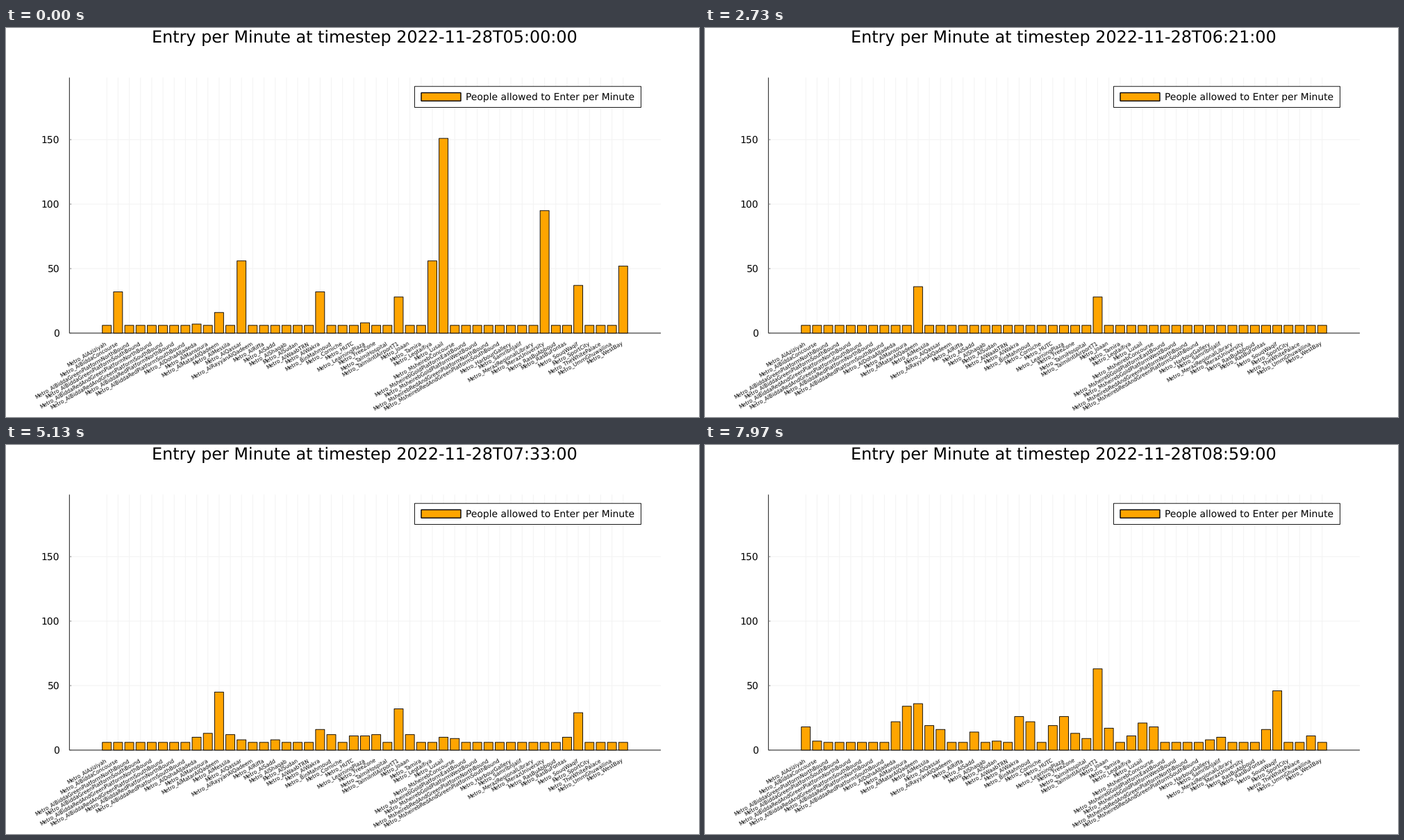
A matplotlib script that plays this animation: 998 by 561 pixels, repeating every 8000 ms.

```python
import matplotlib.pyplot as plt
from matplotlib.animation import FuncAnimation
from matplotlib.collections import LineCollection, PolyCollection
from matplotlib.patches import Rectangle

W, H, DPI = 998, 561, 100
FRAMES, LOOP_MS = 240, 8000
LEFT, RIGHT, TOP, BASE = 91.3, 943, 71.5, 440
FIRST_X, STEP_X = 145.2, 16.165
BAR_W = 0.8 * STEP_X
UNIT = 1.86          # pixels per person
FLOOR = 6            # least entry rate of any station
SLOTS = 8            # half-hour slots from 05:00 to 08:30

STATIONS = """
AlAziziyah AlBiddaConcourse
AlBiddaGreenPlatformNorthBound AlBiddaGreenPlatformSouthBound
AlBiddaRedAndGreenPlatformNorthBound AlBiddaRedAndGreenPlatformSouthBound
AlBiddaRedPlatformNorthBound AlBiddaRedPlatformSouthBound
AlDohaAlJadeda AlMansoura AlMatarAlQadeem AlMessila AlQassar
AlRayyanAlQadeem AlRiffa AlSadd AlShaqab AlSudan AlWaabTRN AlWakra
BinMahmoud Corniche HUTC LearningPlaza FreeZone TalmiHospital
TalmiIntlAirportT1 Joaan Tamira Legtaifiya Lusail MsheirebConcourse
MsheirebGoldPlatformEastBound MsheirebGoldPlatformWestBound
MsheirebRedAndGreenPlatformNorthBound MsheirebRedAndGreenPlatformSouthBound
HarbourGallery SamrIbnJalif MerazRegionalLibrary MerazUniversity
RasBuAbboud RasBuFontas SouqWaqif SportCity TheWhitePalace
UmmGhuwailina WestBay
""".split()

# Rates in the first half hour, where above the floor
OPENING = dict(
    AlBiddaConcourse=32, AlDohaAlJadeda=7, AlMatarAlQadeem=16, AlQassar=56,
    AlWakra=32, LearningPlaza=8, TalmiIntlAirportT1=28, Legtaifiya=56,
    Lusail=151, MerazUniversity=95, SouqWaqif=37, WestBay=52,
)

# Rates of the last slots of the morning; each run ends at 08:30
MORNING = dict(
    AlAziziyah=(11, 18),
    AlBiddaConcourse=(7,),
    AlDohaAlJadeda=(8, 10, 17, 22),
    AlMansoura=(7, 9, 13, 21, 34),
    AlMatarAlQadeem=(36, 42, 44, 45, 42, 36),
    AlMessila=(7, 12, 15, 19),
    AlQassar=(8, 11, 16),
    AlSadd=(8, 11, 14),
    AlSudan=(7,),
    AlWakra=(10, 16, 20, 26),
    BinMahmoud=(8, 11, 12, 17, 22),
    HUTC=(8, 11, 15, 19),
    LearningPlaza=(11, 19, 26),
    FreeZone=(7, 10, 12, 13, 13),
    TalmiHospital=(9,),
    TalmiIntlAirportT1=(28, 34, 32, 32, 45, 63),
    Joaan=(9, 12, 13, 17),
    Legtaifiya=(11,),
    Lusail=(10, 14, 21),
    MsheirebConcourse=(7, 9, 12, 18),
    HarbourGallery=(8,),
    SamrIbnJalif=(10,),
    RasBuFontas=(10, 11, 16),
    SouqWaqif=(26, 27, 29, 34, 46),
    UmmGhuwailina=(9, 11),
)

plt.rcParams["font.family"] = "DejaVu Sans"
plt.rcParams["text.hinting"] = "none"


def px(size):
    """Convert pixels to points."""
    return size * 72 / DPI


def rate(name, slot):
    if slot == 0:
        return OPENING.get(name, FLOOR)
    run = MORNING.get(name, ())
    i = slot - (SLOTS - len(run))
    return run[i] if i >= 0 else FLOOR


def bar_x(i):
    return FIRST_X + i * STEP_X


def bar_shapes(slot):
    shapes = []
    for i, name in enumerate(STATIONS):
        x0, x1 = bar_x(i) - BAR_W / 2, bar_x(i) + BAR_W / 2
        y = BASE - rate(name, slot) * UNIT
        shapes.append([(x0, BASE), (x0, y), (x1, y), (x1, BASE)])
    return shapes


def add_lines(segments, color, width, z):
    ax.add_collection(LineCollection(
        segments, colors=color, linewidths=px(width), snap=False, zorder=z))


def add_box(x, y, w, h, fill, width, z):
    ax.add_patch(Rectangle(
        (x, y), w, h, facecolor=fill, edgecolor="black",
        linewidth=px(width), snap=False, zorder=z))


fig = plt.figure(figsize=(W / DPI, H / DPI), dpi=DPI, facecolor="white")
ax = fig.add_axes([0, 0, 1, 1])
ax.set_xlim(0, W)
ax.set_ylim(H, 0)
ax.axis("off")

xs = [bar_x(i) for i in range(len(STATIONS))]
levels = [(v, BASE - v * UNIT) for v in (0, 50, 100, 150)]

add_lines([[(x, TOP), (x, BASE)] for x in xs]
          + [[(LEFT, y), (RIGHT, y)] for _, y in levels], "#f3f3f3", 1, 1)
add_lines([[(LEFT, TOP), (LEFT, BASE)], [(LEFT, BASE), (RIGHT, BASE)]],
          "black", 0.9, 2)
add_lines([[(LEFT, y), (LEFT + 3, y)] for _, y in levels], "#666666", 0.7, 2)

for value, y in levels:
    ax.text(77.3, y + 5.2, str(value), ha="right", va="baseline",
            fontsize=px(13.9))
for x, name in zip(xs, STATIONS):
    ax.text(x + 0.5, 456, "Metro_" + name, ha="right", va="baseline",
            rotation=30, rotation_mode="anchor", fontsize=px(7.6))

bars = PolyCollection(bar_shapes(0), facecolors="orange", edgecolors="black",
                      linewidths=px(0.9), closed=True, snap=False, zorder=3)
ax.add_collection(bars)

add_box(588.5, 84.2, 326, 30.3, "white", 0.9, 4)
add_box(598, 93.4, 57, 11.8, "orange", 1.4, 5)
ax.text(662.3, 104.5, "People allowed to Enter per Minute",
        va="baseline", fontsize=px(13.9), zorder=5)

title = ax.text(516.2, 21.3, "", ha="center", va="baseline",
                fontsize=px(23.9))


def draw(minute):
    hour, rest = divmod(minute, 60)
    title.set_text("Entry per Minute at timestep "
                   f"2022-11-28T{5 + hour:02d}:{rest:02d}:00")
    bars.set_verts(bar_shapes(minute // 30))
    return title, bars


anim = FuncAnimation(fig, draw, frames=FRAMES, init_func=lambda: draw(0),
                     interval=LOOP_MS / FRAMES, repeat=True, repeat_delay=0)
plt.show()
```
